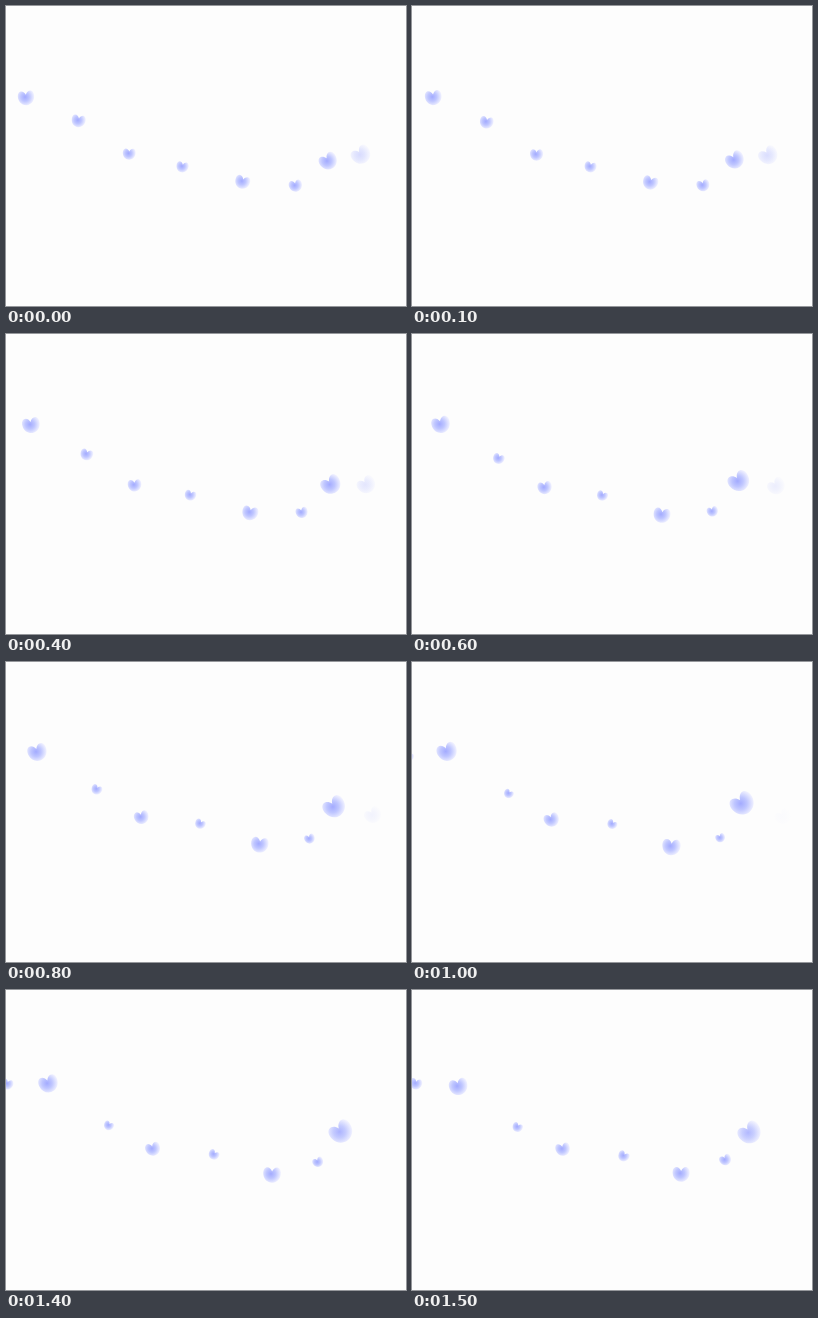
Recreate the animation shown at these times as an HTML page with a canvas. Size 400 by 300 pixels, loop 1600 ms.

```html
<!DOCTYPE html>
<html lang="en">
<head>
<meta charset="utf-8">
<title>Drifting hearts</title>
<style>
  html, body { margin: 0; width: 100%; height: 100%; overflow: hidden; background: #fdfdfd; }
  canvas { display: block; }
</style>
</head>
<body>
<canvas id="stage" width="400" height="300"></canvas>
<script>
const ctx = document.getElementById('stage').getContext('2d');
const LOOP = 1600, FRAME = 100;
const LEG_STEPS = 31, LEAD_STEPS = 18;

// The one path all hearts share: x, y, size, tilt in degrees.
const stops = [
  [-2.5, 94.7, 11, 20],
  [36.5, 89.6, 20.5, -24],
  [98.6, 133.2, 9.5, 34],
  [141, 158.6, 15.5, -22],
  [202, 162.5, 10, 36],
  [261.3, 185.7, 18.7, 4],
  [310, 175.5, 9.5, -23],
  [331.3, 140.5, 24.5, -36],
  [372.5, 155, 16, -35]
];
const LEGS = stops.length - 1;

const outline = new Path2D(
  'M0-.18 C.06-.34 .2-.45 .34-.4 C.47-.35 .52-.18 .49 0 C.45 .27 .24 .45 0 .45' +
  ' C-.24 .45-.45 .27-.49 0 C-.52-.18-.47-.35-.34-.4 C-.2-.45-.06-.34 0-.18Z');

const glow = ctx.createRadialGradient(-0.06, -0.05, 0, -0.06, -0.05, 0.58);
glow.addColorStop(0, '#a3abff');
glow.addColorStop(0.45, '#bfc6ff');
glow.addColorStop(1, '#f6f6ff');

function drawHeart(progress) {
  if (progress >= LEGS) return;
  const leg = Math.max(0, Math.floor(progress));
  const part = progress - leg;
  const [x, y, size, tilt] = stops[leg].map((from, i) => from + (stops[leg + 1][i] - from) * part);
  ctx.save();
  ctx.globalAlpha = Math.min(1, LEGS - progress); // fades out along the last leg
  ctx.translate(x, y);
  ctx.rotate(tilt * Math.PI / 180);
  ctx.scale(size, size);
  ctx.fillStyle = glow;
  ctx.fill(outline);
  ctx.restore();
}

function render(now) {
  const frame = Math.floor((now % LOOP) / FRAME);
  // Twelve motion steps a second, shown at ten pictures a second.
  const step = Math.floor(frame * 12 / 10);
  ctx.fillStyle = '#fdfdfd';
  ctx.fillRect(0, 0, 400, 300);
  for (let i = -1; i < LEGS; i++) drawHeart(i + (step + LEAD_STEPS) / LEG_STEPS);
}

const start = performance.now();
function tick() {
  render(performance.now() - start);
  requestAnimationFrame(tick);
}
tick();
</script>
</body>
</html>
```
